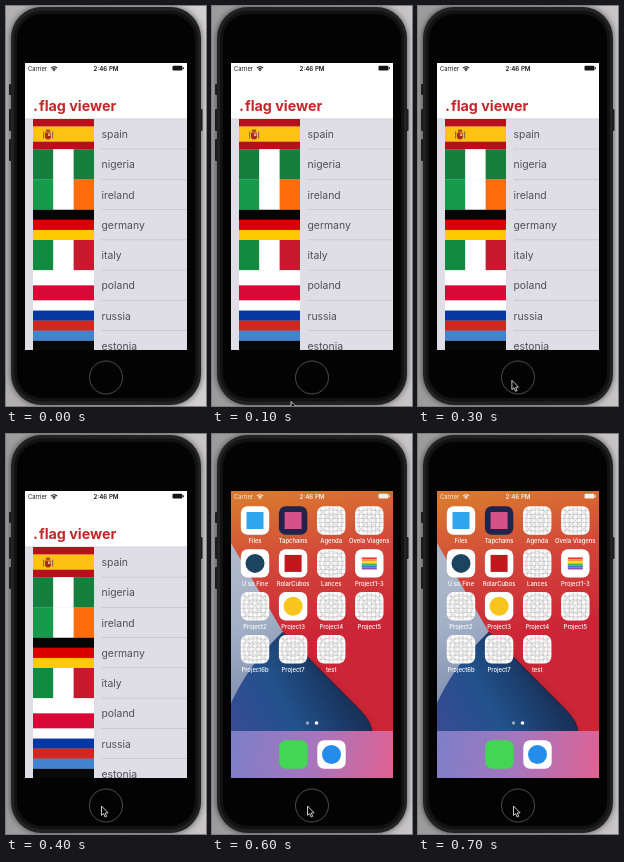
Write an HTML page with a canvas that moves like this. It is 200 by 400 pixels and loops after 800 ms.

```html
<!DOCTYPE html>
<html lang="en">
<head>
<meta charset="utf-8">
<title>Flag viewer</title>
<style>
  html, body { margin: 0; width: 100%; height: 100%; overflow: hidden; background: #999; }
  canvas { display: block; width: 200px; height: 400px; }
</style>
</head>
<body>
<canvas id="stage"></canvas>
<script>
const LOOP = 800, STEP = 100, HOME_AT = 5;
const FONT = 'Inter, "Liberation Sans", sans-serif';
const SCREEN = { x: 19, y: 57, w: 162, h: 287 };
const ICON = 28.4;
const canvas = document.getElementById('stage');
const ratio = window.devicePixelRatio || 1;
canvas.width = 200 * ratio;
canvas.height = 400 * ratio;
const ctx = canvas.getContext('2d');
ctx.scale(ratio, ratio);

function rect(x, y, w, h, fill) {
  ctx.fillStyle = fill;
  ctx.fillRect(x, y, w, h);
}

function round(x, y, w, h, r, fill) {
  ctx.beginPath();
  ctx.roundRect(x, y, w, h, r);
  ctx.fillStyle = fill;
  ctx.fill();
}

function disc(x, y, r, fill) {
  ctx.beginPath();
  ctx.arc(x, y, r, 0, Math.PI * 2);
  ctx.fillStyle = fill;
  ctx.fill();
}

function poly(points, fill) {
  ctx.beginPath();
  points.forEach(([x, y]) => ctx.lineTo(x, y));
  ctx.closePath();
  ctx.fillStyle = fill;
  ctx.fill();
}

function text(str, x, y, size, fill, weight = 400, align = 'left') {
  ctx.font = `${weight} ${size}px ${FONT}`;
  ctx.textAlign = align;
  ctx.fillStyle = fill;
  ctx.fillText(str, x, y);
}

function gradient(x0, y0, x1, y1, colors) {
  const g = ctx.createLinearGradient(x0, y0, x1, y1);
  colors.forEach((c, i) => g.addColorStop(i / (colors.length - 1), c));
  return g;
}

function drawPhone(step) {
  const tones = step === 0 ? ['#b2b0b0', '#d2d0d0'] : ['#9c9b9b', '#c8c6c6'];
  rect(0, 0, 200, 400, gradient(0, 0, 200, 0, tones));
  [[78, 11], [103, 22], [133, 22]].forEach(([y, h]) => round(3, y, 4, h, 1, '#242424'));
  round(193.5, 103, 3, 22, 1, '#242424');
  ctx.save();
  ctx.shadowColor = 'rgba(0,0,0,.6)';
  ctx.shadowBlur = 6 * ratio;
  round(5, 1, 190, 398, 31, '#222');
  ctx.restore();
  round(8, 4.5, 184, 391, 28, '#121212');
  round(11, 8, 178, 384, 25, '#030303');
  ctx.beginPath();
  ctx.arc(100, 371.5, 16.5, 0, Math.PI * 2);
  ctx.strokeStyle = '#606060';
  ctx.lineWidth = 0.8;
  ctx.stroke();
}

function drawStatus(color) {
  text('Carrier', 22, 64.5, 5.8, color);
  ctx.strokeStyle = color;
  ctx.lineWidth = 1.1;
  [2.3, 4.2].forEach(r => {
    ctx.beginPath();
    ctx.arc(48, 65, r, -Math.PI * 0.76, -Math.PI * 0.24);
    ctx.stroke();
  });
  disc(48, 64.4, 0.8, color);
  text('2:46 PM', 100, 64.5, 6.2, color, 600, 'center');
  round(166.5, 59.8, 10, 4.8, 1.3, color);
  rect(177, 61.3, 0.9, 1.8, color);
}

const FLAGS = [
  ['spain', 'h', ['#b5101b', '#ffc20e', '#ffc20e', '#b5101b']],
  ['nigeria', 'v', ['#15803d', '#fff', '#15803d']],
  ['ireland', 'v', ['#169b4a', '#fff', '#ff6c0c']],
  ['germany', 'h', ['#050505', '#d90000', '#ffca00']],
  ['italy', 'v', ['#128a3f', '#fff', '#c9192f']],
  ['poland', 'h', ['#fff', '#d80a35']],
  ['russia', 'h', ['#fff', '#0637a2', '#d22620']],
  ['estonia', 'h', ['#4283cf', '#080808', '#fff']]
];

function drawFlag(y, h, dir, colors) {
  const n = colors.length, w = 61;
  colors.forEach((c, i) => {
    if (dir === 'h') rect(27, y + h * i / n, w, h / n + 0.1, c);
    else rect(27 + w * i / n, y, w / n, h + 0.1, c);
  });
}

function drawCrest(x, y) {
  rect(x - 5, y - 3, 1.2, 7, '#8d7050');
  rect(x + 4, y - 3, 1.2, 7, '#8d7050');
  round(x - 3, y - 2, 6, 7, [1, 1, 3, 3], '#a92c20');
  rect(x, y - 1, 2.4, 2.5, '#d9b29a');
  round(x - 2.2, y - 5, 4.4, 2.5, 1, '#a6502a');
}

function drawList() {
  const { x, y, w, h } = SCREEN, pitch = 30.25;
  rect(x, y, w, h, '#fff');
  drawStatus('#151515');
  text('.', 27, 105, 15, '#c4262a', 700);
  text('flag viewer', 33, 105, 14.3, '#c4262a', 700);
  rect(x, 113, w, 231, '#dfdee7');
  rect(x, 112.6, w, 0.6, '#c4c3cb');
  FLAGS.forEach(([name, dir, colors], i) => {
    const top = 113 + i * pitch;
    drawFlag(top, pitch, dir, colors);
    text(name, 95.5, top + 19, 10.4, '#505056');
    rect(95.5, top + pitch - 0.5, 85.5, 0.7, '#c2c1ca');
  });
  drawCrest(42, 128.5);
}

const APPS = [
  ['Files', 'square', '#2fa5ee'], ['Tapchains', 'square', '#d6508a', '#20234a'],
  ['Agenda', 'grid'], ['Ovela Viagens', 'grid'],
  ['U so Fine', 'circle', '#1c4360'], ['RolarCubos', 'square', '#c3161d'],
  ['Lances', 'grid'], ['Project1-3', 'stripes'],
  ['Project2', 'grid'], ['Project3', 'circle', '#f8c51c'],
  ['Project4', 'grid'], ['Project5', 'grid'],
  ['Project6b', 'grid'], ['Project7', 'grid'], ['test', 'grid']
];

function drawGrid(x, y) {
  const mid = ICON / 2;
  ctx.save();
  ctx.beginPath();
  ctx.roundRect(x, y, ICON, ICON, 6.8);
  ctx.clip();
  ctx.beginPath();
  for (let i = 1; i < 7; i++) {
    const p = i * ICON / 7;
    ctx.moveTo(x + p, y);
    ctx.lineTo(x + p, y + ICON);
    ctx.moveTo(x, y + p);
    ctx.lineTo(x + ICON, y + p);
  }
  ctx.moveTo(x, y);
  ctx.lineTo(x + ICON, y + ICON);
  ctx.moveTo(x + ICON, y);
  ctx.lineTo(x, y + ICON);
  [5, 7.5, 12].forEach(r => {
    ctx.moveTo(x + mid + r, y + mid);
    ctx.arc(x + mid, y + mid, r, 0, Math.PI * 2);
  });
  ctx.strokeStyle = '#b0b0b2';
  ctx.lineWidth = 0.45;
  ctx.stroke();
  ctx.restore();
}

function drawApp(cx, cy, kind, color, tile = '#fff') {
  const x = cx - ICON / 2, y = cy - ICON / 2;
  round(x, y, ICON, ICON, 6.8, tile);
  if (kind === 'grid') drawGrid(x, y);
  if (kind === 'square') rect(cx - 8.5, cy - 8.5, 17, 17, color);
  if (kind === 'circle') disc(cx, cy, 9.5, color);
  if (kind === 'stripes') {
    ['#ef3b3b', '#fb9a35', '#fbdc3c', '#44b758', '#3b7ddd', '#9152b5']
      .forEach((c, i) => rect(cx - 7.5, cy - 6 + i * 2, 15, 2.1, c));
  }
}

function traceRidge() {
  ctx.beginPath();
  ctx.moveTo(70.5, 198);
  ctx.lineTo(147, 275);
  ctx.quadraticCurveTo(160, 288, 160, 299);
}

function drawWallpaper() {
  const { x, y, w, h } = SCREEN;
  rect(x, y, w, h, gradient(70, 57, 100, 200, ['#d9782f', '#d2463a', '#cc2636']));
  poly([[19, 109], [71.5, 199], [60, 250], [19, 290]],
    gradient(19, 130, 65, 240, ['#aeb8ca', '#a4b0c6', '#8796b3']));
  ctx.save();
  traceRidge();
  ctx.lineTo(19, 299);
  ctx.lineTo(19, 269);
  ctx.quadraticCurveTo(37, 230, 70.5, 198);
  ctx.fillStyle = gradient(19, 290, 115, 235, ['#374b92', '#22528c', '#18345d']);
  ctx.fill();
  traceRidge();
  ctx.shadowColor = 'rgba(50,0,20,.7)';
  ctx.shadowBlur = 5 * ratio;
  ctx.strokeStyle = 'rgba(27,27,52,.8)';
  ctx.lineWidth = 1;
  ctx.stroke();
  ctx.restore();
}

function drawHome() {
  drawWallpaper();
  drawStatus('#f8eee6');
  APPS.forEach(([name, kind, color, tile], i) => {
    const x = 43 + (i % 4) * 38.1, y = 86.5 + Math.floor(i / 4) * 42.9;
    drawApp(x, y, kind, color, tile);
    text(name, x, y + 22.3, 5.9, '#fff', 500, 'center');
  });
  disc(95.5, 289, 1.7, 'rgba(255,255,255,.5)');
  disc(104.5, 289, 1.8, '#fff');
  rect(19, 297, 162, 47, gradient(19, 310, 181, 335, ['#7d7fc8', '#a676bd', '#df6293']));
  drawApp(81.5, 320.5, 'plain', '', '#43d653');
  drawApp(119.5, 320.5, 'circle', '#258cec');
}

function drawCursor(step) {
  if (!step) return;
  const lag = step > 3 ? 0 : 3.2 ** (3 - step);
  const x = 95.5 - 1.6 * lag;
  const y = 372 + 2.3 * lag;
  const shape = [[0, 0], [0, 9.4], [2.1, 7.5], [3.6, 11], [5.2, 10.3], [3.7, 7], [6.6, 6.8]];
  ctx.lineWidth = 0.9;
  ctx.strokeStyle = '#dedede';
  poly(shape.map(([dx, dy]) => [x + dx, y + dy]), '#000');
  ctx.stroke();
}

function draw(now) {
  const step = Math.floor((now % LOOP) / STEP);
  drawPhone(step);
  ctx.save();
  ctx.beginPath();
  ctx.rect(SCREEN.x, SCREEN.y, SCREEN.w, SCREEN.h);
  ctx.clip();
  if (step < HOME_AT) drawList();
  else drawHome();
  ctx.restore();
  drawCursor(step);
}

const start = performance.now();
function tick() {
  draw(performance.now() - start);
  requestAnimationFrame(tick);
}
tick();
</script>
</body>
</html>
```
